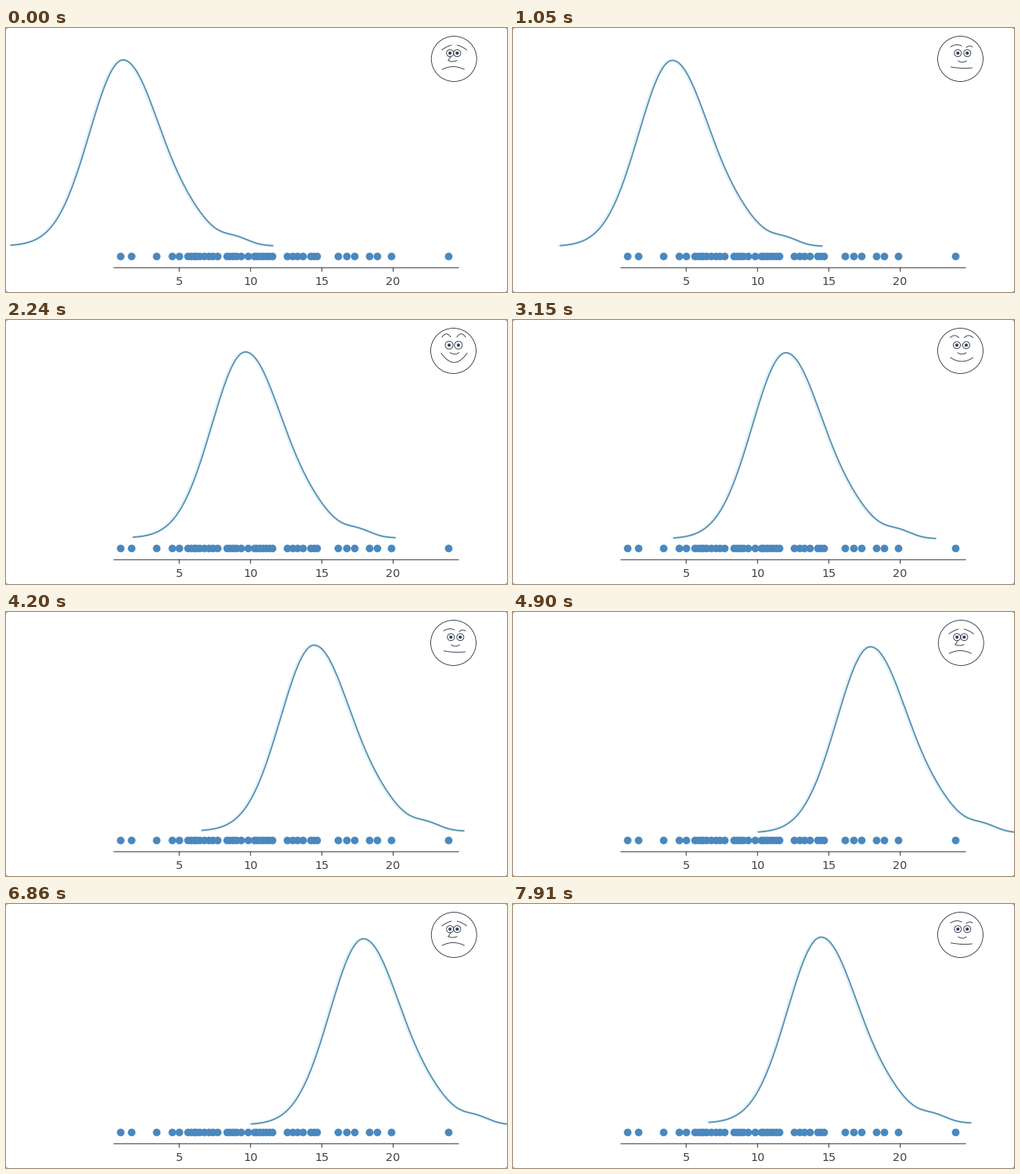
A matplotlib script that plays this animation: 640 px wide and 338 px high, repeating every 8000 ms.

```python
import numpy as np
import matplotlib.pyplot as plt
from matplotlib.animation import FuncAnimation
from matplotlib.patches import Circle, Polygon

W, H, DPI = 640, 338, 100
LOOP, STEP = 8000, 20
PX = 72 / DPI  # points per pixel

BLUE, CURVE, HALO = "#4a88be", "#5790b2", "#e2f4f7"
INK, AXIS = "#343b47", "#4f4f4f"

plt.rcParams["font.family"] = "DejaVu Sans"
fig = plt.figure(figsize=(W / DPI, H / DPI), dpi=DPI, facecolor="white")
ax = fig.add_axes([0, 0, 1, 1])
ax.set_xlim(0, W)
ax.set_ylim(H, 0)
ax.axis("off")


def line(x, y, color, width, z=2):
    return ax.plot(x, y, color=color, lw=width * PX, zorder=z, snap=False)[0]


def disc(x, y, r, z, fill="white", width=0.9):
    return ax.add_patch(Circle((x, y), r, fc=fill, ec=INK,
                               lw=width * PX, zorder=z))


def arc(x, y, w, bend, tilt=0, power=2):
    """Curved stroke centred on x, y with half width w."""
    u = np.linspace(-1, 1, 40)
    return line(x + w * u, y + tilt * u + bend * abs(u) ** power, INK, 0.9, 6)


def pair(cx, dx, y, w, bend, tilt=0):
    """Two arcs mirrored about cx."""
    return [arc(cx - dx, y, w, bend, tilt), arc(cx + dx, y, w, bend, -tilt)]


def head(cx, gap, r=4.5, x=571.5):
    """Outline and two eyes set gap either side of cx."""
    parts = [disc(x, 39.5, 29, 5)]
    for ex in (cx - gap, cx + gap):
        parts += [disc(ex, 32.2, r, 6), disc(ex, 32.2, 1.8, 7, "#1f3f66", 0.4)]
    return parts


# Happiest first
faces = [
    head(572, 5.9, 5) + pair(572, 9.5, 17.8, 5.5, 4) + [
        arc(573, 43.7, 5.7, -2), arc(572.5, 54.3, 16.5, -11.8)],
    head(573, 6) + pair(573, 9, 19.9, 5.5, 2.6) + [
        arc(573.5, 43.7, 5.5, -1.8), arc(573.3, 53, 14.3, -4.8)],
    head(574.3, 6) + [
        arc(566, 21.6, 7, 2, -0.6), arc(583, 23, 4, 1.6, -0.4),
        arc(574, 43.8, 5.3, -1.8), arc(573, 51.4, 13.5, -1, 0.6)],
    head(571.8, 4.6, x=572.3) + pair(572.7, 9.7, 24.2, 6, 0.8, -3) + [
        arc(566.5, 39.3, 1.5, 0, -2.3), arc(570.5, 42.9, 5.5, -1.3),
        arc(571.3, 49.5, 14, 3.5)],
    head(571.2, 5, 4.8) + pair(571.5, 13, 26.5, 4, -0.5, -4.8)
    + pair(571.2, 5, 29, 4.5, 1.2) + [
        arc(571, 43.6, 6, -1.6), arc(573, 49.6, 11.8, 8, power=4)],
]

# Samples along the axis, as evenly spaced runs: first, last, count
runs = [(146, 160, 2), (192, 212, 2), (221, 232, 2), (236, 247, 4),
        (253, 270, 4), (282, 294, 4), (300, 317, 3), (320, 340, 6),
        (359, 379, 4), (389, 397, 3), (424, 445, 3), (464, 474, 2),
        (492, 565, 2)]
dots = np.concatenate([np.linspace(*run) for run in runs])
ax.plot(dots, np.full(len(dots), 292.3), "o", color=BLUE, ms=9.8 * PX, mew=0)

line([138, 578], [306.9, 306.9], AXIS, 1.2)
for value in (5, 10, 15, 20):
    x = 130.2 + 18.22 * value
    line([x, x], [307, 311.3], AXIS, 1.2)
    ax.text(x, 328.8, str(value), ha="center", va="baseline",
            fontsize=14.4 * PX, color="#3f3f3f")

# Rounded stage corners
for x, sx in ((0, 1), (W, -1)):
    for y, sy in ((0, 1), (H, -1)):
        ax.add_patch(Polygon([(x, y), (x + 2 * sx, y), (x, y + 2 * sy)],
                             fc="#9a9a9a", ec="none"))


def bump(d, height, center, width):
    return height * np.exp(-((d - center) / width) ** 2 / 2)


# Density curve around its peak: steeper on the left, two swells on the right
offset = np.linspace(-143, 191, 300)
density = (bump(offset, 238, 0, np.where(offset < 0, 43, 48))
           + bump(offset, 15, 90, 27) + bump(offset, 8.5, 145, 17))
halo = line([], [], HALO, 3.2, 3)
curve = line([], [], CURVE, 1.8, 4)

# Peak x and baseline y of each stop, then the times of the moves in ms
STOPS = [(149.7, 279), (203.7, 279.5), (258.7, 279.5), (306, 279),
         (348.7, 280), (393.7, 280.5), (456.7, 282.6), (546.7, 281.3)]
STARTS = 70 * np.array([0, 10, 21, 32, 45, 58, 70, 83, 98, 111])
BEST, LAST = 3, 7


def draw(k):
    move = np.searchsorted(STARTS, k * STEP + STEP / 2, side="right") - 1
    stop = LAST - abs(LAST - move)  # out to the last stop, then back
    x, y = STOPS[stop]
    curve.set_data(x + offset, y - density)
    halo.set_data(x + offset - 1.8, y - density)
    for i, parts in enumerate(faces):
        for part in parts:
            part.set_visible(i == abs(stop - BEST))
    return [curve, halo]


anim = FuncAnimation(fig, draw, frames=LOOP // STEP, interval=STEP,
                     init_func=lambda: draw(0), repeat=True, repeat_delay=0)
plt.show()
```
